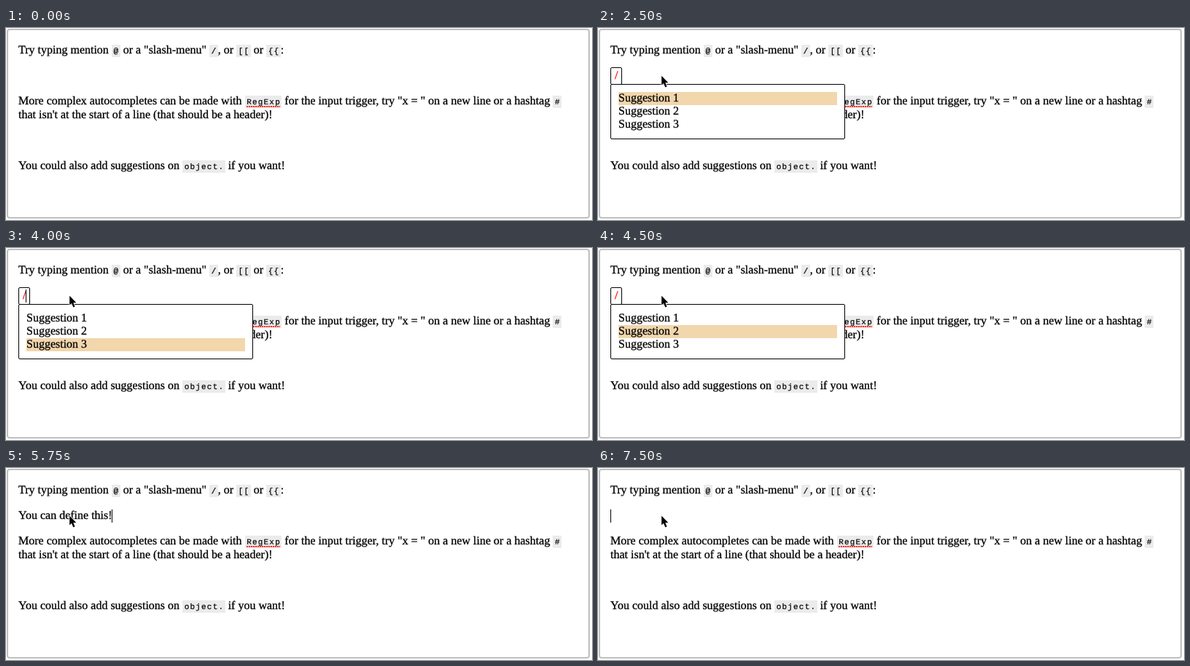
Animation, 804 px wide and 264 px high, one loop 8000 ms. Source, as an HTML page:

```html
<!DOCTYPE html>
<html lang="en">
<head>
<meta charset="utf-8">
<title>Autocomplete editor</title>
<style>
  html, body { margin: 0; width: 100%; height: 100%; overflow: hidden; background: #fff; }
  #stage {
    position: relative; width: 804px; height: 264px; overflow: hidden; color: #000;
    font: 16px/18px "Liberation Serif", "Times New Roman", serif;
    text-rendering: geometricPrecision; -webkit-text-stroke: .3px currentColor;
  }
  #stage > *, .menu > * { position: absolute; box-sizing: border-box; margin: 0; white-space: pre; }
  .frame { left: 1px; top: 1px; width: 800px; height: 261px; border: 2px solid #bfbfbf; border-radius: 4px; }
  .line { left: 17px; }

  code {
    position: relative; padding: 4px 1.4px 1px 2.6px; background: #ebebeb;
    font: 11px/0 "Liberation Mono", "Courier New", monospace;
    letter-spacing: 1.2px; -webkit-text-stroke-width: .2px;
  }
  .misspelt::after {
    content: ""; position: absolute; left: 2px; right: 2px; bottom: 1px; height: 2px;
    background: repeating-linear-gradient(90deg, #f03a32 0 2px, #f8b5b0 2px 3px);
  }

  /* Everything changes in hard steps on one shared clock. */
  .step { animation: 8s step-end infinite; }

  .tag, .menu { visibility: hidden; background: #fff; border: 1px solid #000; border-radius: 2px; animation-name: open; }
  .tag { left: 17px; top: 54px; width: 16px; height: 24px; padding: 2px 5px; color: #f00; }
  .menu { left: 17px; top: 77px; width: 322px; height: 76px; }
  .menu ul { left: 10px; top: 10px; padding: 0; list-style: none; white-space: normal; }
  .bar { left: 10px; top: 10px; width: 300px; height: 18px; background: #f2d6ac; animation-name: pick; }
  .typed { visibility: hidden; animation-name: typed; }
  .caret { left: 17px; top: 57px; width: 1px; height: 18px; background: #000; animation-name: caret; }
  .pointer { left: 0; top: 0; width: 13px; height: 19px; animation-name: point; }

  @keyframes open {
    0% { visibility: hidden; }
    25% { visibility: visible; }
    71.875%, 100% { visibility: hidden; }
  }
  @keyframes pick {
    0% { transform: none; }
    37.5% { transform: translateY(18px); }
    43.75% { transform: translateY(36px); }
    53.125% { transform: translateY(18px); }
    59.375%, 100% { transform: none; }
  }
  @keyframes typed {
    0% { visibility: hidden; }
    71.875% { visibility: visible; }
    90.625%, 100% { visibility: hidden; }
  }
  @keyframes caret {
    0%, 15.625% { left: 17px; opacity: 0; }
    9.375%, 21.875% { left: 17px; opacity: 1; }
    25%, 37.5%, 50%, 62.5% { left: 27px; opacity: 1; }
    31.25%, 43.75%, 56.25%, 68.75% { left: 27px; opacity: 0; }
    71.875%, 84.375% { left: 145px; opacity: 1; }
    78.125% { left: 145px; opacity: 0; }
    90.625%, 100% { left: 17px; opacity: 1; }
  }
  @keyframes point {
    0% { transform: translate(218px, 28px); opacity: 0; }
    3.125% { transform: translate(218px, 28px); opacity: 1; }
    6.25% { transform: translate(110px, 59px); opacity: 1; }
    9.375% { transform: translate(109px, 61px); opacity: 1; }
    12.5% { transform: translate(91px, 64px); opacity: 1; }
    15.625%, 100% { transform: translate(86px, 65px); opacity: 1; }
  }
</style>
</head>
<body>
<div id="stage">
  <div class="frame"></div>
  <p class="line" style="top:22px">Try typing mention <code>@</code> or a "slash-menu" <code>/</code>, or <code>[[</code> or <code>{{</code>:</p>
  <p class="line typed step" style="top:57px">You can define this!</p>
  <p class="line" style="top:92px">More complex autocompletes can be made with <code class="misspelt">RegExp</code> for the input trigger, try "x = " on a new line or a hashtag <code>#</code></p>
  <p class="line" style="top:111px">that isn't at the start of a line (that should be a header)!</p>
  <p class="line" style="top:181px">You could also add suggestions on <code>object.</code> if you want!</p>

  <div class="tag step">/</div>
  <div class="menu step">
    <div class="bar step"></div>
    <ul><li>Suggestion 1</li><li>Suggestion 2</li><li>Suggestion 3</li></ul>
  </div>
  <div class="caret step"></div>
  <svg class="pointer step" viewBox="0 0 13 19">
    <path d="M1.2 .8V13.6L4 11L6.3 16.4L8.6 15.4L6.3 10.2H10.4Z" stroke="#fff" stroke-width="1.6" paint-order="stroke"/>
  </svg>
</div>
</body>
</html>
```
